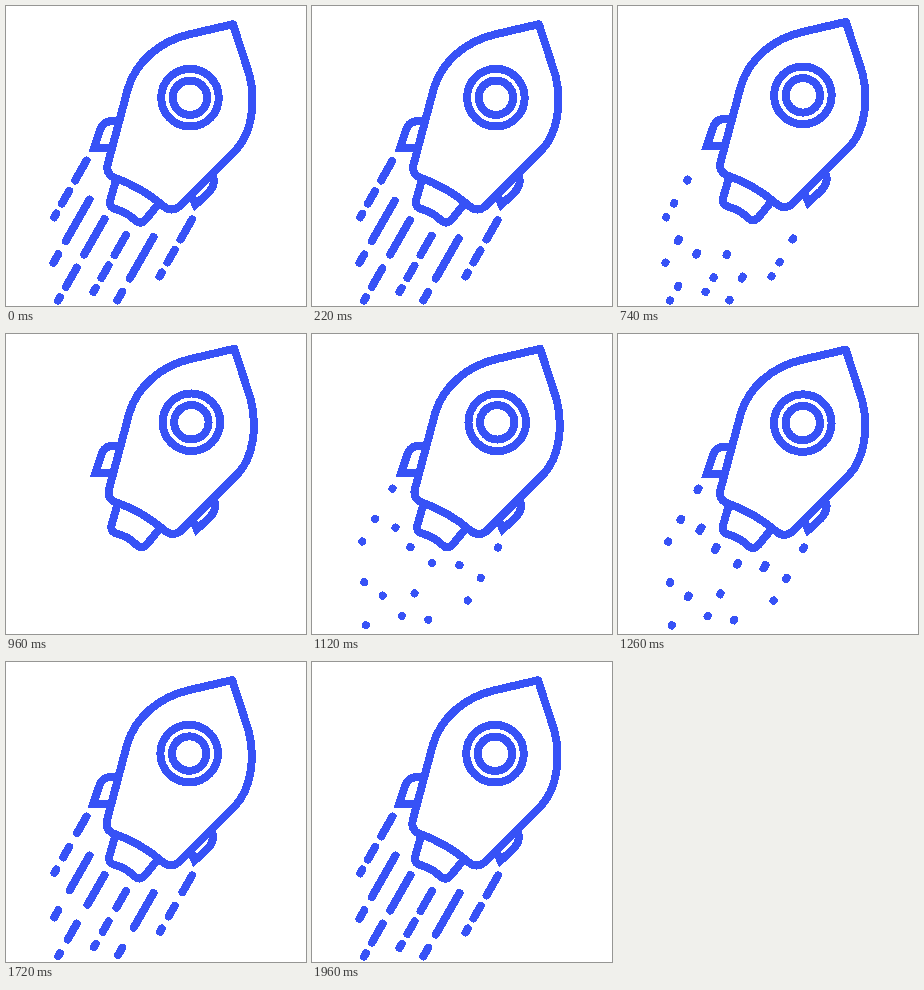
These frames come from a looping animation (300 px wide and 300 px high, 1.98 s). An HTML page:

```html
<!DOCTYPE html>
<html lang="en">
<head>
<meta charset="utf-8">
<title>Rocket</title>
<style>
  html, body { margin: 0; width: 100%; height: 100%; overflow: hidden; background: #fff; }
  svg { display: block; width: 100%; height: 100%; }
</style>
</head>
<body>
<svg viewBox="0 0 300 300" fill="none" stroke="#3752f6" stroke-width="8" shape-rendering="crispEdges">
  <g id="trails" stroke-linecap="round"></g>
  <g id="rocket">
    <path d="M112 115 H106 Q97 115 94 124 L88 142 H105"/>
    <path d="M205 168 C210 173 208 181 202 187 L189.500 198.500 L185 188"/>
    <g stroke-linejoin="round">
      <path d="M110 174 L104.500 193 Q102 201 110 203 Q121 206 129 214 Q134.500 219 140 213 L153 197"/>
      <path d="M227 18 L184 28 C153 35 130 56 122 82 L101.500 159 Q100 167 107 171 C126 177.500 142 186.500 157 199.500 Q165 206.500 173 200.500 L231 142.500 C245 127 250.500 98 243.500 69 Z"/>
    </g>
    <circle cx="184" cy="91.500" r="28.800"/>
    <circle cx="184" cy="91.500" r="17.200"/>
  </g>
</svg>
<script>
const LOOP = 1980;

// Alternating dash and gap lengths along an exhaust column
const FADING = [23, 12, 14.5, 11.5, 4.5];
const LONG = [48, 15, 10];
const MIXED = [41, 15, 22, 12, 4];

const columns = [
  { x: 80.5, y: 154.5, pattern: FADING },
  { x: 83.5, y: 193.5, pattern: LONG },
  { x: 98.5, y: 213, pattern: MIXED },
  { x: 120, y: 229, pattern: FADING },
  { x: 147.5, y: 231, pattern: LONG },
  { x: 186, y: 213.5, pattern: FADING }
];

const trails = document.getElementById('trails');
const rocket = document.getElementById('rocket');

function add(parent, tag) {
  return parent.appendChild(document.createElementNS('http://www.w3.org/2000/svg', tag));
}

const dashes = columns.flatMap(({ x, y, pattern }) => {
  const column = add(trails, 'g');
  column.setAttribute('transform', `translate(${x} ${y}) rotate(119.700)`);
  let offset = 0;
  return pattern.flatMap((length, i) => {
    const head = offset;
    offset += length;
    return i % 2 ? [] : [{ line: add(column, 'line'), head, length }];
  });
});

function easeInOut(t, start, end, power) {
  const p = Math.min(1, Math.max(0, (t - start) / (end - start)));
  return p < 0.5 ? (2 * p) ** power / 2 : 1 - (2 - 2 * p) ** power / 2;
}

function drawTrails(from, to) {
  trails.setAttribute('visibility', to > from ? 'visible' : 'hidden');
  for (const { line, head, length } of dashes) {
    line.setAttribute('x1', head + length * from);
    line.setAttribute('x2', head + length * to);
  }
}

function render(t) {
  // The rocket rises and sinks while drifting slightly left
  const lift = ((1 + Math.cos((t - 1020) / LOOP * 2 * Math.PI)) / 2) ** 2;
  const x = 1.9 * lift - t / LOOP;
  const y = 0.2 - 3.5 * lift;
  rocket.setAttribute('transform', `translate(${x} ${y})`);

  if (t < 1020) drawTrails(easeInOut(t, 33, 953, 3), 1);
  else drawTrails(0, easeInOut(t, 1080, LOOP, 2));
}

const start = performance.now();
function tick() {
  render((performance.now() - start) % LOOP);
  requestAnimationFrame(tick);
}
render(0);
requestAnimationFrame(tick);
</script>
</body>
</html>
```
